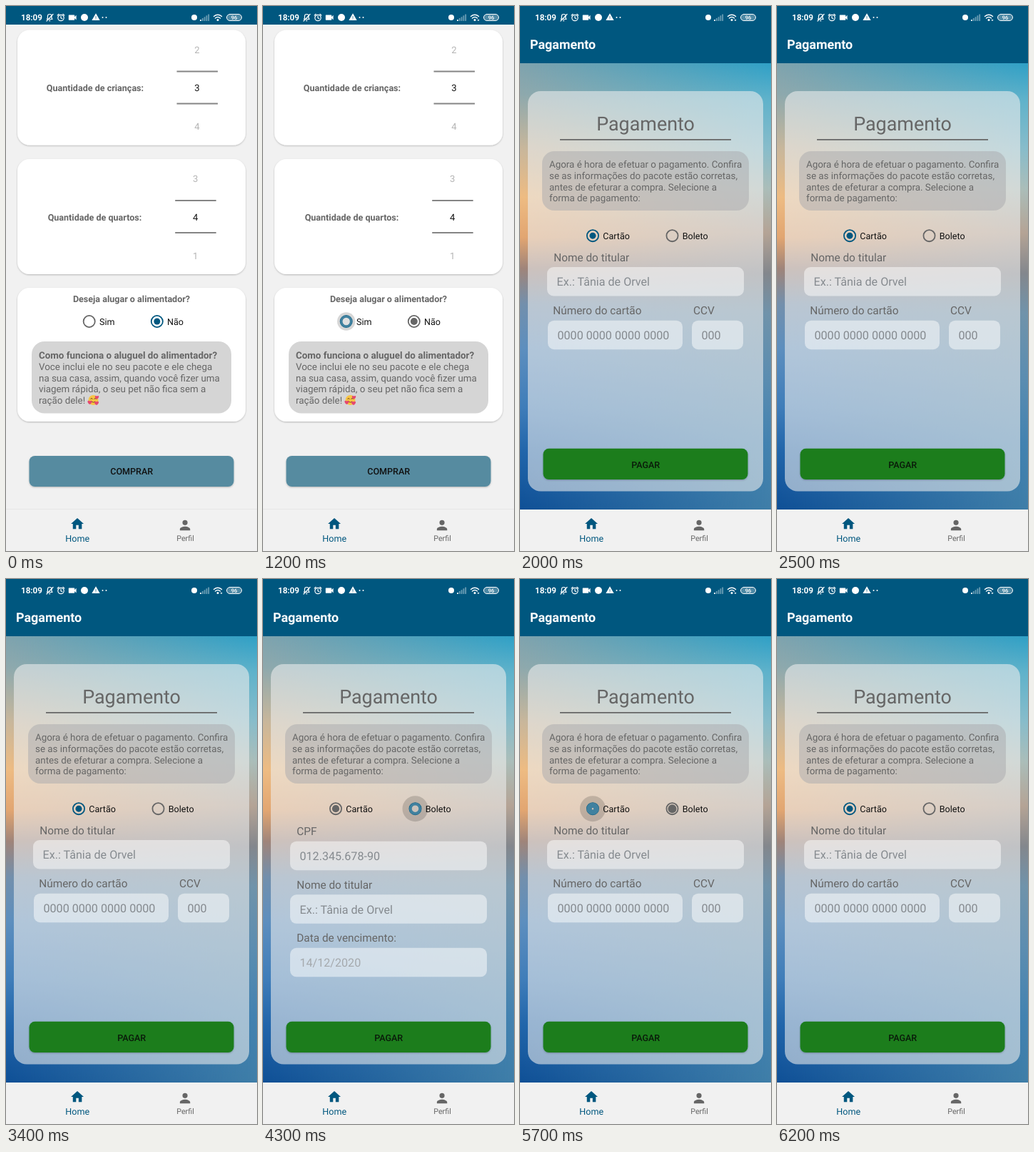
Recreate the animation shown at these times as an HTML page. Size 352x762 px, loop 6300 ms.

```html
<!DOCTYPE html>
<html lang="pt-BR">
<head>
<meta charset="utf-8">
<title>Pagamento</title>
<style>
html, body { margin: 0; width: 100%; height: 100%; overflow: hidden; background: #f1f1f1; }
svg { display: block; width: 352px; height: 762px; }
text { font-family: Roboto, sans-serif; white-space: pre; text-rendering: geometricPrecision; }
</style>
</head>
<body>
<svg id="stage" viewBox="0 0 352 762"></svg>
<script>
const LOOP = 6300, DP = 0.8963;
const BLUE = '#00577f', GRAY = '#666';
const stage = document.getElementById('stage');

// Markup helpers
const rect = (x, y, w, h, r, fill, extra = '') =>
  `<rect x="${x}" y="${y}" width="${w}" height="${h}" rx="${r}" fill="${fill}" ${extra}/>`;
const text = (x, y, size, fill, str, extra = '') =>
  `<text x="${x}" y="${y}" font-size="${size}" fill="${fill}" ${extra}>${str}</text>`;
const mid = (x, y, size, fill, str, weight = 400) =>
  text(x, y, size, fill, str, `text-anchor="middle" font-weight="${weight}"`);
const lines = (x, y, list) =>
  list.map((s, i) => text(x, y + i * 15.7, 13.36, GRAY, s)).join('');
const icon = (x, y, scale, fill, d) =>
  `<path transform="translate(${x} ${y}) scale(${scale})" fill="${fill}" d="${d}"/>`;
const rule = (x1, x2, y, color) =>
  `<path d="M${x1} ${y}H${x2}" stroke="${color}" stroke-width="1.8"/>`;
const radio = (id, x, y, label) =>
  `<g id="${id}" transform="translate(${x} ${y})">
     <circle class="halo"/><circle class="ring" fill="none"/><circle class="dot"/>
     <circle class="touch" r="8.5" fill="#fff" fill-opacity=".25"/>
   </g>` + text(x + 14.3, y + 4.6, 12.55, '#111', label);
const gradient = (id, stops, extra) =>
  `<linearGradient id="${id}" ${extra}>` + stops.map(([at, color]) =>
    `<stop offset="${at}" stop-color="${color}"/>`).join('') + '</linearGradient>';
const DOWN = 'x1="0" y1="0" x2="0" y2="1"';

const HOME = 'M10 20v-6h4v6h5v-8h3L12 3 2 12h3v8z';
const PERSON = 'M12 12a4 4 0 1 0 0-8 4 4 0 0 0 0 8zm0 2c-2.67 0-8 1.34-8 4v2h16v-2c0-2.66-5.33-4-8-4z';
const VIDEO = 'M17 10.5V7a1 1 0 0 0-1-1H4a1 1 0 0 0-1 1v10a1 1 0 0 0 1 1h12a1 1 0 0 0 1-1v-3.5l4 4v-11z';
const WARN = 'M1 21h22L12 2zm12-3h-2v-2h2zm0-4h-2v-4h2z';
const HEART = 'M0 3C-5 0-3-4 0-1.6C3-4 5 0 0 3z';

function defs() {
  return `<defs>
    ${gradient('skyLeft', [[0, '#7fa3ae'], [.07, '#8fa9ad'], [.19, '#c9b79b'], [.3, '#efbc82'],
      [.39, '#e3a671'], [.46, '#a0857a'], [.54, '#7390ad'], [.64, '#5d8fbf'], [.77, '#3f7dba'],
      [.87, '#2165ab'], [1, '#0f5096']], DOWN)}
    ${gradient('skyRight', [[0, '#2fa0c6'], [.08, '#5eb2cb'], [.19, '#86bccb'], [.28, '#a9bdba'],
      [.38, '#b3a396'], [.47, '#83878d'], [.56, '#7093aa'], [.7, '#5c8db0'], [.85, '#4483b0'],
      [1, '#3f7ea8']], DOWN)}
    ${gradient('fade', [[0, '#000'], [1, '#fff']], '')}
    <mask id="toRight"><rect y="80" width="352" height="624" fill="url(#fade)"/></mask>
    <filter id="shade" x="-10%" y="-10%" width="120%" height="130%">
      <feDropShadow dx="0" dy="1" stdDeviation="1" flood-opacity=".25"/>
    </filter>
  </defs>`;
}

function statusBar() {
  const bars = [0, 1, 2, 3, 4].map(i =>
    rect(272 + i * 2.8, 19 - i * 1.9, 1.9, 2 + i * 1.9, .4, '#fff', `opacity="${i < 1 ? 1 : .4}"`)).join('');
  return text(21, 20.2, 11.6, '#fff', '18:09', 'font-weight="700"') +
    `<g fill="none" stroke="#fff" stroke-width="1.2" stroke-linecap="round" stroke-linejoin="round">
      <path d="M57.5 18.5h7.5l-1-1.6v-2.6a2.8 2.8 0 0 0-5.6 0v2.6zM60.6 20.6h1.2M57 21 66 11.5"/>
      <circle cx="77" cy="16.5" r="4.2"/><path d="M77 14v2.7l1.8 1M72.2 13l2-1.7M81.8 13l-2-1.7"/>
      <rect x="309.5" y="11.5" width="21" height="9" rx="4.5" stroke-width="1" fill="#fff" fill-opacity=".3"/>
      <path d="M291.5 14.5q5.5-4.5 11 0M293.5 17q3.5-2.8 7 0" stroke-width="1.5"/>
    </g>` +
    icon(86, 8.9, .6, '#fff', VIDEO) +
    '<circle cx="110" cy="16" r="5" fill="#fff"/>' +
    icon(119.9, 9.3, .51, '#fff', WARN) +
    '<circle cx="135.5" cy="16" r="1" fill="#fff"/><circle cx="140.5" cy="16" r="1" fill="#fff"/>' +
    '<circle cx="264" cy="16" r="4" fill="#fff"/>' + bars +
    '<circle cx="297" cy="19.5" r="1.5" fill="#fff"/>' +
    '<path id="traffic" d="M300.5 19h3l-1.5 2.2z" fill="#fff"/>' +
    mid(320, 18.9, 7.6, '#fff', '96', 500);
}

function navBar() {
  return rect(0, 704, 352, 58, 0, '#f1f1f1') +
    icon(89.3, 713.2, DP, BLUE, HOME) + mid(100.2, 748.8, 12.55, BLUE, 'Home') +
    icon(240.3, 715.2, DP, GRAY, PERSON) + mid(251.5, 748.4, 10.76, GRAY, 'Perfil');
}

function picker(y, title, titleX, x, values) {
  return rect(16, y, 320, 161, 17, '#fff', 'filter="url(#shade)"') +
    mid(titleX, y + 85.5, 12.55, GRAY, title, 700) +
    rule(x - 28.5, x + 29, y + 58, '#858585') + rule(x - 28.5, x + 29, y + 103, '#858585') +
    values.map((v, i) => mid(x, y + 32.3 + i * 53.6, 13, i === 1 ? '#111' : '#b4b4b4', v)).join('');
}

function orderPage() {
  const hearts = [[-5, 3, 1], [5, -4, .9], [4.5, 4, 1]].map(([x, y, s]) =>
    `<path transform="translate(${x} ${y}) scale(${s})" fill="#e5486f" d="${HEART}"/>`).join('');
  return rect(0, 26, 352, 678, 0, '#f1f1f1') + rect(0, 703, 352, 1, 0, '#e6e6e6') +
    picker(33.5, 'Quantidade de crianças:', 125, 268, [2, 3, 4]) +
    picker(214, 'Quantidade de quartos:', 124.5, 265.7, [3, 4, 1]) +
    rect(16, 394, 320, 187, 17, '#fff', 'filter="url(#shade)"') +
    mid(176, 413.5, 12.55, GRAY, 'Deseja alugar o alimentador?', 700) +
    radio('yes', 116.7, 441, 'Sim') + radio('no', 211.8, 441, 'Não') +
    rect(36, 469, 280, 100.5, 18, '#d5d5d5') +
    text(46, 493.2, 13.36, GRAY, 'Como funciona o aluguel do alimentador?', 'font-weight="700"') +
    lines(46, 508.8, ['Voce inclui ele no seu pacote e ele chega', 'na sua casa, assim, quando você fizer uma',
      'viagem rápida, o seu pet não fica sem a', 'ração dele!']) +
    `<g transform="translate(122.5 551)"><circle r="7" fill="#f6c445"/>
      <path d="M-4-1.5q1.5-2 3 0M1-1.5q1.5-2 3 0M-2.5 2q2.5 2.5 5 0" fill="none" stroke="#75421f"/>${hearts}</g>` +
    rect(32.5, 629, 287, 43, 8, '#578ba0', 'filter="url(#shade)"') +
    mid(176.2, 655.4, 12.55, '#111', 'COMPRAR', 500) +
    `<g id="buyTouch"><circle cx="187" cy="642" r="10.5" fill="#e3edf1" fill-opacity=".5"/>
      <circle cx="187" cy="642" r="8" fill="#e3edf1" fill-opacity=".35"/></g>`;
}

const field = (x, y, w, hint, color = '#858a8f') =>
  rect(x, y, w, 40.5, 9, '#fff', 'fill-opacity=".48"') + text(x + 13.5, y + 26.3, 16.13, color, hint);
const label = (x, y, str) => text(x, y, 15.4, GRAY, str);

function payPage() {
  const holder = 'Ex.: Tânia de Orvel';
  return rect(0, 80, 352, 624, 0, 'url(#skyLeft)') +
    rect(0, 80, 352, 624, 0, 'url(#skyRight)', 'mask="url(#toRight)"') +
    rect(0, 26, 352, 54, 0, BLUE) +
    text(14, 60.2, 17.93, '#fff', 'Pagamento', 'font-weight="700"') +
    rect(11, 119, 330, 559.5, 18, '#eee', 'fill-opacity=".58"') +
    mid(176, 174.2, 26.9, GRAY, 'Pagamento') + rule(56, 296, 186.8, '#666') +
    rect(31, 203, 290, 83, 17, '#a9a9ad', 'fill-opacity=".5"') +
    lines(41, 226.3, ['Agora é hora de efetuar o pagamento. Confira', 'se as informações do pacote estão corretas,',
      'antes de efeturar a compra. Selecione a', 'forma de pagamento:']) +
    radio('card', 102, 321.2, 'Cartão') + radio('slip', 213.5, 321.2, 'Boleto') +
    '<g id="cardForm">' + label(47.2, 356.7, 'Nome do titular') + field(38, 365, 276, holder) +
    label(46.2, 431, 'Número do cartão') + field(39, 439.7, 189, '0000 0000 0000 0000') +
    label(243, 431, 'CCV') + field(241, 439.7, 72, '000') + '</g>' +
    '<g id="slipForm">' + label(47.2, 358, 'CPF') + field(38, 366.7, 276, '012.345.678-90') +
    label(47.2, 432.7, 'Nome do titular') + field(38, 441.3, 276, holder) +
    label(47.2, 507.3, 'Data de vencimento:') + field(38, 515.8, 276, '14/12/2020', '#a5a9ad') + '</g>' +
    rect(32.5, 618.8, 287, 43.2, 8, '#1a7d1f', 'filter="url(#shade)"') +
    mid(176.2, 645.6, 12.55, '#0a1a0a', 'PAGAR', 500);
}

stage.innerHTML = defs() + `<g id="order">${orderPage()}</g><g id="pay">${payPage()}</g>` +
  navBar() + rect(0, 0, 352, 26, 0, BLUE) + statusBar();

// Timeline in ms
const BUY = { down: 1790, up: 1995 };
const SIM = { down: 1060, set: 1150 };
const SLIP = { down: 4080, set: 4240 };
const CARD = { down: 5460, set: 5550 };
const TURN = 183, SETTLE = 516;

const $ = id => document.getElementById(id);
const show = (el, on) => el.setAttribute('visibility', on ? 'inherit' : 'hidden');
const set = (el, attrs) => { for (const k in attrs) el.setAttribute(k, attrs[k]); };
const ramp = (t, a, b) => Math.min(1, Math.max(0, (t - a) / (b - a)));

// Checking closes the ring inwards, then settles the dot; unchecking runs the other way.
function drawRadio(id, on, age, press) {
  const [halo, ring, dot, touch] = $(id).children;
  const first = age < TURN, a = ramp(age, 0, TURN), b = ramp(age, TURN, SETTLE);
  let width = 2, size = 0;
  if (on) {
    if (first) width = 2 + 8 * a;
    else size = 1.4 - .4 * b;
  } else {
    if (first) size = 1 + .4 * a;
    else width = 10 - 8 * b;
  }
  const color = on ? BLUE : GRAY;
  set(ring, { r: (10 - width / 2) * DP, 'stroke-width': width * DP, stroke: color });
  set(dot, { r: 5 * size * DP, fill: color });
  set(halo, { r: 18 * ramp(press, 0, 200), 'fill-opacity': press < 0 ? 0 : .16 * (1 - ramp(press, 260, 560)) });
  show(touch, press >= 0 && press < 250);
}

function draw(t) {
  const paying = t >= BUY.up;
  show($('order'), !paying);
  show($('pay'), paying);
  show($('buyTouch'), t >= BUY.down && t < BUY.up);
  show($('traffic'), t >= 1100);

  const sim = t >= SIM.set, simAge = sim ? t - SIM.set : SETTLE;
  drawRadio('yes', sim, simAge, t - SIM.down);
  drawRadio('no', !sim, simAge, -1);

  const slip = t >= SLIP.set && t < CARD.set;
  const age = t < SLIP.set ? SETTLE : t - (slip ? SLIP.set : CARD.set);
  drawRadio('card', !slip, age, t - CARD.down);
  drawRadio('slip', slip, age, t - SLIP.down);
  show($('cardForm'), !slip);
  show($('slipForm'), slip);
}

const start = performance.now();
function tick() {
  draw((performance.now() - start) % LOOP);
  requestAnimationFrame(tick);
}
tick();
</script>
</body>
</html>
```
